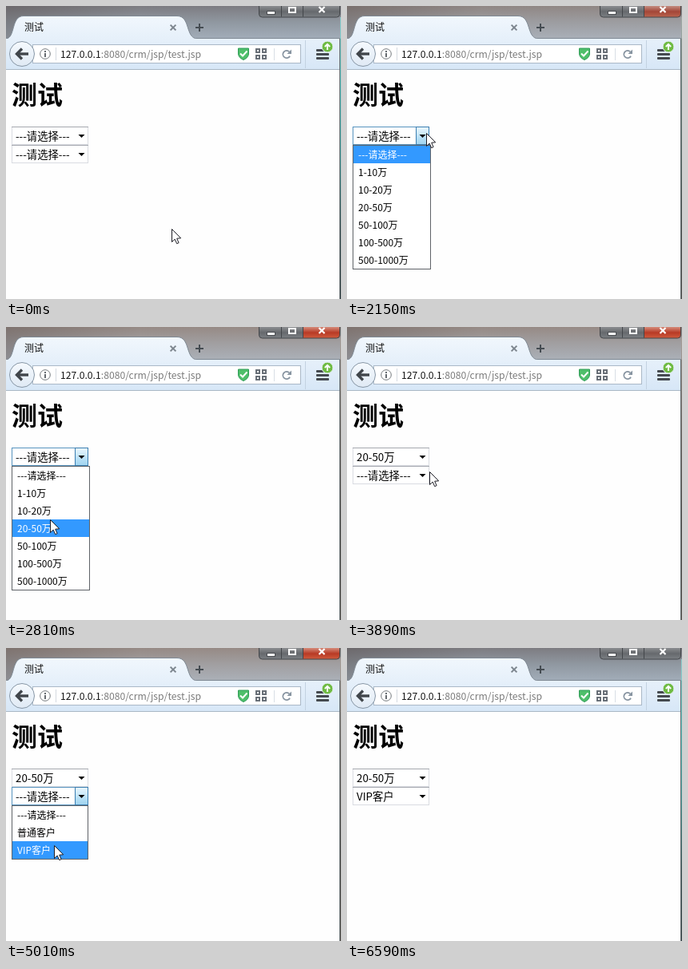
Recreate the animation shown at these times as an HTML page with a canvas. Size 419x367 px, loop 6690 ms.

```html
<!DOCTYPE html>
<html lang="zh">
<head>
<meta charset="utf-8">
<title>测试</title>
<style>
html, body { margin: 0; width: 100%; height: 100%; overflow: hidden; background: #fefefe; }
canvas { display: block; width: 419px; height: 367px; }
</style>
</head>
<body>
<canvas id="stage" width="419" height="367"></canvas>
<script>
const ctx = document.getElementById('stage').getContext('2d');
const LOOP = 6690;
const FONT = '"Noto Sans CJK SC", "Noto Sans CJK", "Noto Sans", sans-serif';
const PROMPT = '---请选择---';
const AMOUNTS = [PROMPT, '1-10万', '10-20万', '20-50万', '50-100万', '100-500万', '500-1000万'];
const KINDS = [PROMPT, '普通客户', 'VIP客户'];

// Pointer stops: time, x, y
const POINTER = [
  [0, 207, 279], [130, 185, 245], [280, 161, 207], [400, 139, 173],
  [550, 128, 164], [670, 121, 159], [820, 112, 159], [940, 103, 159], [1060, 99, 159],
  [2420, 90, 178], [2540, 72, 208], [2660, 58, 237], [2810, 55, 241],
  [3520, 82, 205], [3640, 106, 179], [3890, 103, 181], [4050, 95, 188], [4200, 94, 188],
  [4730, 78, 224], [4860, 60, 246], [5010, 60, 247],
  [5910, 84, 262], [6030, 134, 284], [6160, 162, 293]
];

const within = (t, a, b) => t >= a && t < b;

function rect(x, y, w, h, fill) {
  ctx.fillStyle = fill;
  ctx.fillRect(x, y, w, h);
}

function frame(x, y, w, h, stroke) {
  ctx.strokeStyle = stroke;
  ctx.lineWidth = 1;
  ctx.strokeRect(x + 0.5, y + 0.5, w - 1, h - 1);
}

function label(str, x, y, size, color = '#000', weight = 400) {
  ctx.font = `${weight} ${size}px ${FONT}`;
  ctx.fillStyle = color;
  ctx.fillText(str, x, y);
  return ctx.measureText(str).width;
}

function line(points, color, width = 1) {
  ctx.beginPath();
  points.forEach(([x, y]) => ctx.lineTo(x, y));
  ctx.strokeStyle = color;
  ctx.lineWidth = width;
  ctx.stroke();
}

function disc(x, y, r, fill, stroke) {
  ctx.beginPath();
  ctx.arc(x, y, r, 0, Math.PI * 2);
  if (fill) { ctx.fillStyle = fill; ctx.fill(); }
  if (stroke) { ctx.strokeStyle = stroke; ctx.lineWidth = 1; ctx.stroke(); }
}

function poly(points, fill) {
  ctx.beginPath();
  points.forEach(([x, y]) => ctx.lineTo(x, y));
  ctx.closePath();
  ctx.fillStyle = fill;
  ctx.fill();
}

function blend(x0, y0, x1, y1, ...colors) {
  const g = ctx.createLinearGradient(x0, y0, x1, y1);
  colors.forEach((c, i) => g.addColorStop(i / (colors.length - 1), c));
  return g;
}

function cross(x, y, r, color, width) {
  line([[x - r, y - r], [x + r, y + r]], color, width);
  line([[x + r, y - r], [x - r, y + r]], color, width);
}

function windowButtons(active) {
  const shape = () => {
    ctx.beginPath();
    ctx.roundRect(316.5, -4, 101, 18, 4);
  };
  ctx.save();
  shape();
  ctx.clip();
  rect(316, 0, 102, 14, blend(0, 0, 0, 14, '#8b8d90', '#66696d', '#7b7f83'));
  ctx.globalAlpha = active;
  rect(371, 0, 47, 14, blend(0, 0, 0, 14, '#d58c7b', '#b83a25', '#cf5b3d'));
  ctx.restore();
  shape();
  ctx.strokeStyle = '#43464a';
  ctx.lineWidth = 1;
  ctx.stroke();
  for (const x of [344.5, 371.5]) line([[x, 0], [x, 13.5]], '#43464a');
  rect(326, 6, 11, 5, '#4a4d51');
  rect(327, 7, 9, 3, '#fff');
  ctx.strokeStyle = '#fff';
  ctx.lineWidth = 2;
  ctx.strokeRect(354, 2, 8, 6);
  cross(395, 4.5, 3.5, '#fff', 2.2);
}

function titleBar(active) {
  rect(0, 0, 419, 41, blend(0, 0, 0, 41, '#7d7c81', '#9098a1', '#a2adb9'));
  ctx.globalAlpha = active;
  rect(0, 0, 419, 41, blend(0, 0, 0, 41, '#968a85', '#a19fa1', '#abb0b8'));
  ctx.globalAlpha = 1;
  rect(0, 0, 170, 41, blend(0, 0, 170, 0, 'rgba(70,60,58,.3)', 'rgba(70,60,58,0)'));

  ctx.beginPath();
  ctx.moveTo(0, 41);
  ctx.bezierCurveTo(12, 40, 6, 12.5, 22, 12.5);
  ctx.lineTo(214, 12.5);
  ctx.bezierCurveTo(231, 12.5, 224, 40, 239, 41);
  ctx.fillStyle = blend(0, 13, 0, 41, '#f1f7fd', '#e6f0fa');
  ctx.fill();
  ctx.strokeStyle = '#7f8993';
  ctx.lineWidth = 1;
  ctx.stroke();
  label('测试', 23, 31, 12, '#111');
  cross(209, 27, 3.4, '#7c858d', 2);
  rect(237, 26, 10, 2, '#454c52');
  rect(241, 22, 2, 10, '#454c52');
  windowButtons(active);
}

function reloadIcon() {
  ctx.beginPath();
  ctx.arc(351, 60.5, 4.6, 0.5, Math.PI * 1.75);
  ctx.strokeStyle = '#8794a1';
  ctx.lineWidth = 1.8;
  ctx.stroke();
  poly([[357, 54.5], [357, 60], [351.5, 60]], '#8794a1');
}

function shieldIcon() {
  ctx.beginPath();
  ctx.moveTo(290.5, 53);
  ctx.lineTo(303.5, 53);
  ctx.lineTo(303.5, 60);
  ctx.quadraticCurveTo(303, 65, 297, 67.5);
  ctx.quadraticCurveTo(291, 65, 290.5, 60);
  ctx.closePath();
  ctx.fillStyle = '#4fbf6a';
  ctx.fill();
  ctx.strokeStyle = '#2f9c58';
  ctx.lineWidth = 1;
  ctx.stroke();
  line([[293, 59.5], [296, 62.5], [301.5, 56.5]], '#fff', 2);
}

function toolbar() {
  rect(0, 41, 419, 38, blend(0, 41, 0, 79, '#e6f0fa', '#d7e7f7'));
  rect(238, 40, 181, 1, '#7f8993');
  rect(0, 79, 419, 1, '#a9b7c5');
  rect(374, 43, 1, 35, '#c3d2e1');
  rect(33, 48, 336, 24, '#fff');
  frame(33, 48, 336, 24, '#aab8c7');

  disc(20, 60, 15.5, blend(0, 44, 0, 76, '#f6fafe', '#dfe9f4'), '#8796a5');
  line([[14, 60], [28, 60]], '#41464b', 3.4);
  line([[20, 53.5], [13.5, 60], [20, 66.5]], '#41464b', 3.4);

  disc(49, 60, 6.3, null, '#73787c');
  rect(48, 59, 2, 5, '#666b70');
  rect(48, 56, 2, 2, '#666b70');
  rect(62, 52, 1, 16, '#d5dae0');
  const w = label('127.0.0.1', 68, 65, 12.2, '#111');
  label(':8080/crm/jsp/test.jsp', 68 + w, 65, 12.2, '#7b7b7b');

  shieldIcon();
  ctx.strokeStyle = '#697078';
  ctx.lineWidth = 2;
  for (const x of [313, 321]) for (const y of [54, 62]) ctx.strokeRect(x, y, 4, 4);
  rect(335, 53, 1, 15, '#d9dfe5');
  reloadIcon();

  for (let i = 0; i < 3; i++) {
    ctx.beginPath();
    ctx.roundRect(388, 54 + i * 5, 16, 3, 1);
    ctx.fillStyle = '#454a4f';
    ctx.fill();
  }
  disc(402, 51, 7, '#6fbb43', '#e9f2f8');
  line([[402, 55], [402, 48]], '#fff', 2);
  line([[398.8, 51], [402, 47.8], [405.2, 51]], '#fff', 1.8);
}

function edge(active) {
  rect(417, 41, 1, 326, '#5c6568');
  rect(418, 14, 1, 353, blend(0, 14, 0, 367, '#8fd0cf', '#62c9c6', '#55a5a4', '#4a6062', '#414d4f'));
  ctx.globalAlpha = active;
  rect(418, 14, 1, 353, blend(0, 14, 0, 367, '#a79f99', '#78716c', '#565451', '#625d58'));
  ctx.globalAlpha = 1;
}

function select(y, str, hot) {
  rect(7, y, 96, 23, '#fff');
  frame(7, y, 96, 23, hot ? '#5794bf' : '#d9dbe1');
  if (!hot) rect(7, y, 96, 1, '#a5a8af');
  label(str, 12, y + 17, 13.33);
  if (hot) {
    rect(86, y, 17, 23, blend(0, y, 0, y + 23, '#eaf6fd', '#d2ecfa', '#b3def5', '#9fd3ef'));
    frame(86, y, 17, 23, '#3c7fb1');
  }
  poly([[90.5, y + 10], [98.5, y + 10], [94.5, y + 14]], '#000');
}

function popup(y, w, items, picked) {
  const h = items.length * 22 + 2;
  rect(7, y, w, h, '#fff');
  items.forEach((str, i) => {
    const top = y + 1 + i * 22;
    if (i === picked) rect(8, top, w - 2, 22, '#3399ff');
    label(str, 14, top + 15.5, 12, i === picked ? '#fff' : '#000');
  });
  frame(7, y, w, h, '#5f6368');
}

function pointer(x, y) {
  ctx.beginPath();
  [[0, 0], [0, 16], [3.7, 12.6], [6.2, 18.2], [8.6, 17.1], [6.2, 11.7], [11.2, 11.3]]
    .forEach(([dx, dy]) => ctx.lineTo(x + 0.5 + dx, y + 0.5 + dy));
  ctx.closePath();
  ctx.fillStyle = '#fff';
  ctx.fill();
  ctx.strokeStyle = '#1c1c24';
  ctx.lineWidth = 1;
  ctx.stroke();
}

function draw(t) {
  const active = within(t, 2150, 6590) ? (t < 2270 ? 0.75 : 1) : 0;
  rect(0, 0, 419, 367, '#fefefe');
  titleBar(active);
  toolbar();
  edge(active);
  label('测试', 7, 123, 32, '#000', 700);

  select(151, t < 3370 ? PROMPT : AMOUNTS[3], within(t, 940, 3370));
  select(174, t < 5910 ? PROMPT : KINDS[2], within(t, 4050, 5910));

  const [, x, y] = POINTER.findLast(p => p[0] <= t);
  const row = top => Math.max(0, Math.floor((y - top) / 22));
  if (within(t, 2150, 3370)) popup(174, 98, AMOUNTS, row(175));
  if (within(t, 4340, 5760)) popup(197, 96, KINDS, row(198));
  if (t < 6590) pointer(x, y);
}

const start = performance.now();
function tick() {
  draw((performance.now() - start) % LOOP);
  requestAnimationFrame(tick);
}
tick();
</script>
</body>
</html>
```
